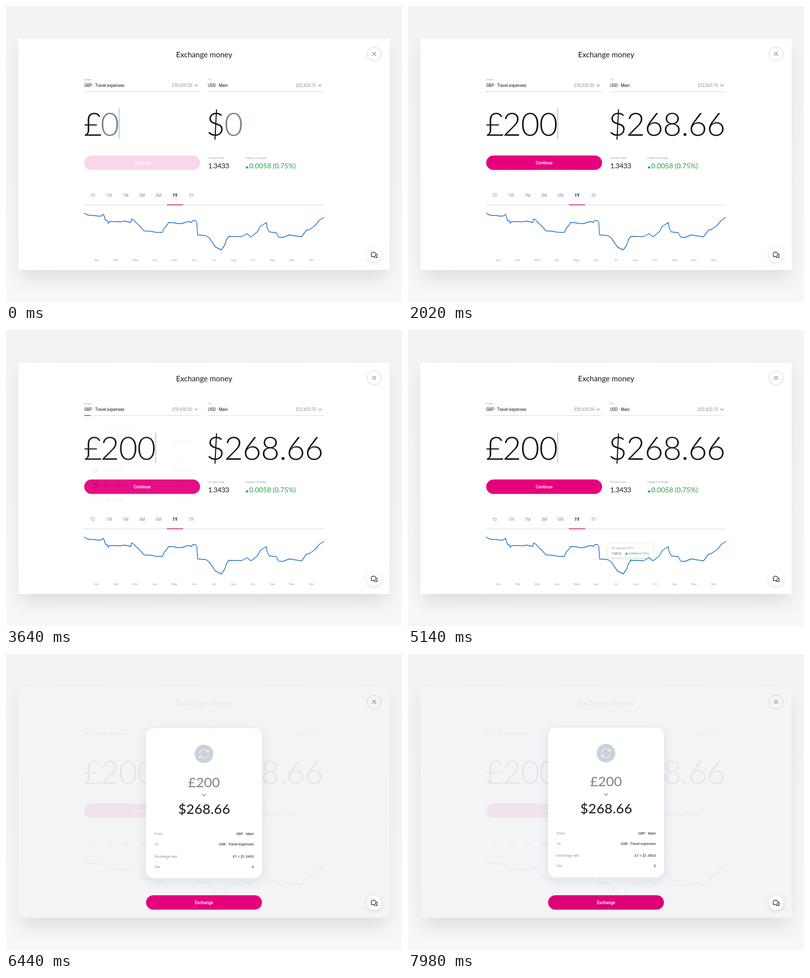
Recreate the animation shown at these times as an HTML page. Size 800 by 600 pixels, loop 8000 ms.

```html
<!DOCTYPE html>
<html lang="en">
<head>
<meta charset="utf-8">
<title>Exchange money</title>
<style>
  html, body { margin: 0; width: 100%; height: 100%; overflow: hidden; background: #f4f5f6; }
  svg { display: block; width: 100vw; height: 100vh; }
  text { font-family: Roboto, Arial, sans-serif; font-size: 8.25px; fill: #14171a; white-space: pre; }
  .geo { font-family: Lato, "Open Sans", sans-serif; }
  .big { font-size: 65px; font-weight: 300; letter-spacing: -.7px; fill: #0d0f11; }
  .sum { font-size: 27.7px; }
  .tiny { font-size: 6.25px; }
  .row { font-size: 7.25px; }
  .dim { fill: #8b929b; }
  .pale { fill: #9aa0a8; }
  .up { fill: #1fa33a; }
  .end { text-anchor: end; }
  .mid { text-anchor: middle; }
  .btn { fill: #fff; font-size: 8.5px; font-weight: 500; text-anchor: middle; }
  .line { fill: none; stroke-linecap: round; stroke-linejoin: round; }
</style>
</head>
<body>
<svg viewBox="0 0 800 600" preserveAspectRatio="none">
  <defs>
    <linearGradient id="sky" x2="0" y2="1">
      <stop offset="0" stop-color="#f2f3f5"/>
      <stop offset="1" stop-color="#f6f7f7"/>
    </linearGradient>
    <filter id="blurL" x="-20%" y="-30%" width="140%" height="160%"><feGaussianBlur stdDeviation="17"/></filter>
    <filter id="soft" x="-30%" y="-30%" width="160%" height="170%">
      <feDropShadow dx="0" dy="2" stdDeviation="3" flood-color="#39424e" flood-opacity=".17"/>
    </filter>
    <filter id="wide" x="-30%" y="-30%" width="160%" height="160%">
      <feDropShadow dx="0" dy="5" stdDeviation="10" flood-color="#39424e" flood-opacity=".1"/>
    </filter>
    <clipPath id="disc"><circle r="6.5"/></clipPath>
  </defs>

  <rect width="800" height="600" fill="url(#sky)"/>
  <rect x="30" y="86" width="740" height="466" fill="#3c4046" opacity=".13" filter="url(#blurL)"/>
  <rect x="25" y="66" width="750" height="469" fill="#fff"/>

  <g id="page">
    <text class="geo mid" x="400.3" y="104" style="font-size:15.3px">Exchange money</text>
    <g id="accounts"></g>

    <text class="geo big" x="156.5" y="262.5">£<tspan id="from" x="191"></tspan></text>
    <text class="geo big" x="404.5" y="262.5">$<tspan id="to" x="441"></tspan></text>
    <rect id="caret" y="207" width="1" height="62" fill="#6aa5dc"/>

    <rect id="cta" x="158" y="303" width="234" height="29.3" rx="14.6" fill="#e6007e"/>
    <text class="btn" x="275" y="320.5">Continue</text>

    <text class="tiny pale" x="408" y="310">Current rate</text>
    <text class="geo" x="408.5" y="329" style="font-size:14px;letter-spacing:-.3px">1.3433</text>
    <text class="tiny pale" x="483" y="310">Today's change</text>
    <path class="up" d="M483.8 329l3.2-5 3.2 5z"/>
    <text class="geo up" x="491.6" y="329" style="font-size:14px">0.0058 (0.75%)</text>

    <path d="M158 403.3H642" stroke="#d8dfe4" stroke-width="1.2"/>
    <path d="M325 403H358" stroke="#c4146f" stroke-width="1.6"/>
    <g id="tabs"></g>
    <path id="curve" class="line" transform="translate(0 .5)" stroke="#1769c7" stroke-width="1.4"/>
    <g id="months"></g>
  </g>

  <g id="tip">
    <circle cx="450" cy="467" r="2.3" fill="#1769c7" stroke="#fff"/>
    <g id="tipBox">
      <rect x="404.5" y="433.5" width="90" height="27.5" rx="2" fill="#fff" filter="url(#soft)"/>
      <text class="tiny dim" x="411" y="444.3">23 January 2017</text>
      <text class="tiny" x="411" y="455">1.2212</text>
      <path class="up" d="M438.6 455l2.7-4.3 2.7 4.3z"/>
      <text class="tiny up" x="445" y="455">0.0058 (0.75%)</text>
    </g>
  </g>

  <g id="menu">
    <rect x="158" y="174" width="234" height="181" fill="#fff" filter="url(#soft)"/>
    <rect x="388.5" y="210" width="3.5" height="37" fill="#dfe2e5"/>
    <path class="line" d="M184.5 196.2l-2.2-2.2" stroke="#7f868f" stroke-width="1.2"/>
    <circle cx="180.4" cy="192" r="2.8" fill="none" stroke="#7f868f"/>
    <text class="dim" x="195.7" y="195.5">Search account</text>
    <g id="list"></g>
  </g>
  <rect id="focus" x="158" y="172.5" height="1.7" fill="#1c76c6"/>

  <rect id="veil" x="25" y="66" width="750" height="469" fill="#f2f4f6"/>

  <g class="line">
    <circle cx="743.7" cy="97.2" r="14.3" stroke="#cdd1d5"/>
    <path d="M740.2 93.7l7 7m0-7l-7 7" stroke="#6f757c" stroke-width="1.2"/>
  </g>
  <circle cx="743.7" cy="504" r="14.8" fill="#fff" filter="url(#soft)"/>
  <path class="line" stroke="#22262a" stroke-width="1.2"
    d="M738.7 506.3l-.9 2 2.6-.8A4.8 4.5 0 1 0 738.7 506.3M748.4 502.4A4 4 0 0 1 749.1 507.6L750 510.2 747.4 509.3A4.6 4.6 0 0 1 743.4 509.1"/>

  <g id="modal">
    <g id="card">
      <rect x="283" y="149" width="234" height="303.7" rx="15" fill="#fff" filter="url(#wide)"/>
      <circle cx="400" cy="201" r="18.8" fill="#cad1d9"/>
      <g class="line" stroke="#fff" stroke-width="1.2">
        <path d="M391.2 199.5a9 9 0 0 1 16.5-3.2M408.8 202.5a9 9 0 0 1-16.5 3.2"/>
        <path d="M408.8 192.5v4.3h-4.3M391.2 209.5v-4.3h4.3"/>
      </g>
      <text class="geo sum mid" x="400" y="268.3" style="fill:#7b828e">£200</text>
      <path class="line" d="M396.7 283l3.3 3.3 3.3-3.3" stroke="#7b828e" stroke-width="1.3"/>
      <text class="geo sum mid" x="400.5" y="322.5" style="letter-spacing:.3px">$268.66</text>
      <g id="details"></g>
    </g>
    <rect id="confirm" x="283" y="489" width="234" height="29.3" rx="14.6"/>
    <text class="btn" x="400" y="506.5">Exchange</text>
  </g>
</svg>

<script>
const LOOP = 8000;
const $ = id => document.getElementById(id);
const set = (id, attrs) => { for (const k in attrs) $(id).setAttribute(k, attrs[k]); };
const text = (x, y, s, cls = '', style = '') => `<text x="${x}" y="${y}" class="${cls}" style="${style}">${s}</text>`;

// Static parts
const account = (x, label, name, sum, id) =>
  text(x, 151, label, 'tiny pale') + text(x, 163.5, name) + text(x + 218.5, 163.5, sum, 'dim end') +
  `<path d="M${x} 173.5h234" stroke="#d6dce1"/>` +
  `<g transform="translate(${x + 226.3} 161)"><path id="${id}" class="line" d="M-2.7-1.4L0 1.4 2.7-1.4" stroke="#7f868f" stroke-width="1.2"/></g>`;
$('accounts').innerHTML =
  account(158, 'From', 'GBP · Travel expenses', '£50,630.50', 'arrowFrom') +
  account(408, 'To', 'USD · Main', '$32,420.70', 'arrowTo');

$('tabs').innerHTML = ['1D', '1W', '1M', '3M', '6M', '1Y', '5Y'].map((s, i) =>
  text(175 + i * 33.3, 387, s, i === 5 ? 'mid' : 'mid dim', i === 5 ? 'font-weight:700' : '')).join('');

$('months').innerHTML = 'Jan Feb Mar Apr May Jun Jul Aug Oct Sep Nov Dec'.split(' ')
  .map((s, i) => text(182 + i * 39.6, 516.7, s, 'tiny mid pale')).join('');

set('curve', { d: `M158 419L163 422.5 169 424 176 424 187 425.5 193 425 197 421.5 201 434 205 435 206.5 440 209 436.5
  219 436.5 231 437 240 435.5 252 438.5 254 431 258 433.5 263 439 270 445 274 450 279 455.5 292 456 301 458 316 458.5
  319 451 326 442.5 328 438.5 340 439 346 440.5 355 440.5 368 436.5 375 438 377 434.5 383 434.5 385.5 438.5 387 463.5
  404 465 411 470 417 479 423 488 435 494 442 484 445 474 450 466.5 476 467 487 461 495 467.5 508 457 514 446 526 438.5
  527.5 449 532 457.5 546 459 551 468 560 468.5 572 463.5 597 467.5 607 454 613 452.5 624 445 633 434 642 428` });

const union = `<path d="M-7-7L7 7M7-7L-7 7" stroke="#fff" stroke-width="2.6"/><path d="M-7-7L7 7M7-7L-7 7" stroke="#d8263c"/>
  <path d="M0-7V7M-7 0H7" stroke="#fff" stroke-width="4"/><path d="M0-7V7M-7 0H7" stroke="#d8263c" stroke-width="2.2"/>`;
const ground = c => `<rect x="-7" y="-7" width="14" height="14" fill="${c}"/>`;
const ring = (n, r) => Array.from({ length: n }, (_, i) => {
  const a = i / n * 2 * Math.PI;
  return `<circle cx="${r * Math.sin(a)}" cy="${r * Math.cos(a)}" r=".45" fill="#e9c928"/>`;
}).join('');
const flags = {
  GBP: ground('#274a8f') + union,
  USD: ground('#fff') + [-6, -3.5, -1, 1.5, 4].map(y => `<rect x="-7" y="${y}" width="14" height="1.3" fill="#d8394a"/>`).join('') +
    '<rect x="-7" y="-7" width="7" height="7" fill="#3a5ba8"/>',
  EUR: ground('#1450b4') + ring(12, 3.5),
  AUD: ground('#1450b4') + `<g transform="translate(-3.3 -3.3) scale(.47)">${union}</g>` +
    '<g fill="#fff"><circle cx="-2.5" cy="3" r="1.1"/><circle cx="3" cy="-3" r=".7"/><circle cx="4" cy="1" r=".7"/><circle cx="2" cy="3.5" r=".7"/></g>',
  CAD: ground('#fff') + '<path d="M-7-7h3.4V7H-7zM3.6-7H7V7H3.6zM0-3l.8 1.3 1.7.2-.8 2L.3 1.6V3h-.6V1.6l-1.4-1.1-.8-2 1.7-.2z" fill="#e0302a"/>'
};
$('list').innerHTML = [
  ['GBP', 'Travel expenses', '£50,630.50'], ['USD', 'Main', '$32,420.70'], ['EUR', 'Main', '€42,540.30'],
  ['AUD', 'Main', '$4,420.70'], ['CAD', 'Main', '$9,540.30']
].map(([code, name, sum], i) => {
  const y = 221.7 + i * 29.25;
  return `<g transform="translate(181.2 ${y})"><g clip-path="url(#disc)">${flags[code]}</g></g>` +
    text(195.7, y + 2.9, `${code} · ${name}`) + text(375.3, y + 2.9, sum, 'dim end');
}).join('');

$('details').innerHTML = [
  [365.6, 'From', 'GBP · Main'], [386.5, 'To', 'USB · Travel expenses'],
  [411.3, 'Exchange rate', '£1 = $1.3433'], [432.4, 'Fee', '0']
].map(([y, label, value]) => text(300.3, y, label, 'row dim') + text(500.5, y, value, 'row end')).join('');

// Motion
const ramp = (t, start, length) => Math.min(1, Math.max(0, (t - start) / length));
const inOut = u => u < .5 ? 4 * u ** 3 : 1 - 4 * (1 - u) ** 3;
const out = u => 1 - (1 - u) ** 3;
const mix = (a, b, u) => a + (b - a) * u;

const steps = [[0, '0', '0'], [400, '2', '2.69'], [680, '20', '26.87'], [960, '200', '268.66']];

function draw(t) {
  const [start, from, to] = steps.filter(s => t >= s[0]).pop();
  const ink = start ? '#0d0f11' : '#77808c';
  for (const [id, s] of [['from', from], ['to', to]]) {
    if ($(id).textContent !== s) $(id).textContent = s;
    $(id).style.fill = ink;
  }
  set('caret', { x: 191 + 37 * from.length, opacity: t > 1500 && t % 1000 >= 700 ? 0 : 1 });
  set('cta', { opacity: mix(.16, 1, ramp(t, 400, 300)) });

  const open = inOut(ramp(t, 1975, 400)) - inOut(ramp(t, 3336, 400));
  set('menu', { opacity: open, transform: `translate(0 ${5.5 * (1 - open)})` });
  set('focus', { width: 234 * open });
  set('arrowFrom', { transform: `scale(1 ${1 - 2 * open})` });

  const hover = out(ramp(t, 4500, 250)) - out(ramp(t, 5450, 250));
  set('tip', { opacity: hover });
  set('tipBox', { transform: `translate(0 ${6 * (1 - hover)})` });

  set('veil', { opacity: .935 * out(ramp(t, 5950, 400)) });
  set('modal', { opacity: ramp(t, 6000, 300) });
  set('card', { transform: `translate(0 ${50 * (1 - out(ramp(t, 6000, 640)))})` });
  const press = ramp(t, 7050, 250);
  set('confirm', { fill: `rgb(${mix(230, 221, press)},0,${mix(126, 121, press)})` });
}

function tick() {
  draw(performance.now() % LOOP);
  requestAnimationFrame(tick);
}
tick();
</script>
</body>
</html>
```
